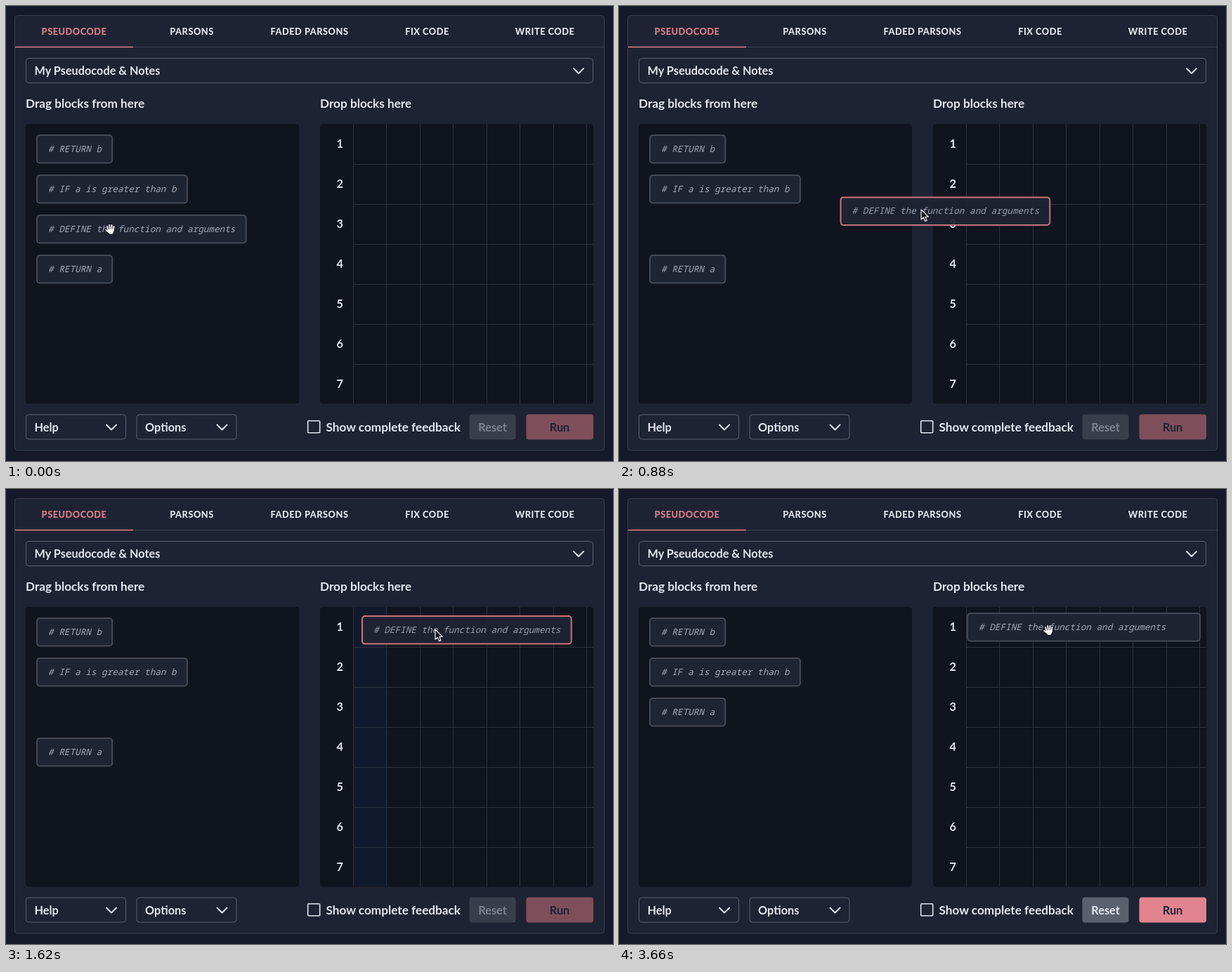
An HTML page that plays this animation: 864 by 648 pixels, repeating every 3.8 s.

```html
<!DOCTYPE html>
<html lang="en">
<head>
<meta charset="utf-8">
<title>Pseudocode blocks</title>
<style>
  html, body { margin: 0; width: 100%; height: 100%; overflow: hidden; background: #15192a; }
  svg { display: block; }
  text { font: 700 16.3px Lato, "Open Sans", sans-serif; fill: #e4e7f0; white-space: pre; }
  .tab { font-size: 12.8px; font-weight: 800; letter-spacing: .5px; text-anchor: middle; }
  .label { font-size: 17.2px; }
  .row { text-anchor: end; }
  .button { text-anchor: middle; }
  .box { fill: #1e2333; stroke: #5b6070; }
  .well { fill: #10141e; }
  .grid { stroke: #2d313d; fill: none; }
  .chevron { fill: none; stroke: #e4e7f0; stroke-width: 2; stroke-linecap: round; stroke-linejoin: round; }
  .block rect { fill: #1f2433; stroke: #454955; stroke-width: 2; }
  .block text { font: italic 500 12.7px "Noto Sans Mono", "DejaVu Sans Mono", monospace; fill: #a4a7b0; }
  #drag rect { stroke: #d47c86; }
</style>
</head>
<body>
<svg id="stage" width="864" height="648" viewBox="0 0 864 648">
  <rect class="box" x="12.5" y="13.5" width="839" height="619.5" rx="4" style="stroke:#3a3f50"/>
  <path d="M13 58.5H851" stroke="#3a3f50"/>
  <path d="M13 58.5H181" stroke="#e08089" stroke-width="1.5"/>
  <g id="ui"></g>
  <rect class="well" x="28" y="168" width="389" height="398.5" rx="4"/>
  <rect class="well" x="447" y="168" width="389" height="398.5" rx="4"/>
  <rect id="glow" x="495" y="168" width="47.5" height="398" fill="#111a2d"/>
  <g id="cells"></g>
  <rect x="429.7" y="590.7" width="17" height="17" rx="1" fill="none" stroke="#e4e7f0" stroke-width="1.6"/>
  <rect id="resetBox" x="659.5" y="581.5" width="66" height="36" rx="4"/>
  <text id="resetText" class="button" x="692.5" y="606">Reset</text>
  <rect id="runBox" x="740.5" y="581.5" width="95.5" height="36" rx="4"/>
  <text class="button" x="788" y="606" style="fill:#1e2333">Run</text>
  <g id="blocks"></g>
  <g id="arrow">
    <path d="M0 0V14.2L3.3 11.2 5.6 16.6 8 15.6 5.8 10.4H10.2Z" fill="#10131c" stroke="#f4f4f6" stroke-width="1.2" stroke-linejoin="round"/>
  </g>
  <g id="hand" stroke-linecap="round" stroke-linejoin="round">
    <path id="palm" d="M-3 1L4.6 .5 4.4 3 3 6.2H-1.2L-3.2 3.2Z" fill="#fff" stroke="#151821" stroke-width="3"/>
    <g id="fingers"></g>
    <path d="M-3 1L4.6 .5 4.4 3 3 6.2H-1.2L-3.2 3.2Z" fill="#fff" stroke="#fff"/>
  </g>
</svg>
<script>
const LOOP = 3800, GRAB = 480, DROP = 1720, GONE = 1860, PLACE = 2060;
const CHAR = 7.62, GRIP = [105, 20], LAG = 15;
const $ = id => document.getElementById(id);

function add(parent, tag, attrs, label) {
  const el = document.createElementNS('http://www.w3.org/2000/svg', tag);
  for (const k in attrs) el.setAttribute(k, attrs[k]);
  if (label) el.textContent = label;
  return parent.appendChild(el);
}
const text = (cls, x, y, label) => add($('ui'), 'text', { class: cls, x, y }, label);

function select(x, y, width, label) {
  add($('ui'), 'rect', { class: 'box', x: x + .5, y: y + .5, width, height: 35, rx: 4 });
  add($('ui'), 'path', { class: 'chevron', d: `M${x + width - 27} ${y + 15}l7 7 7-7` });
  text('', x + 12.5, y + 24, label);
}

function block(label, x, y, width = label.length * CHAR + 32, id = '') {
  const g = add($('blocks'), 'g', { class: 'block', id });
  add(g, 'rect', { x: 1, y: 1, width: width - 1, height: 39.5, rx: 4 });
  add(g, 'text', { x: 17, y: 25 }, label);
  move(g, x, y);
  return g;
}

function move(el, x, y) { el.setAttribute('transform', `translate(${x} ${y})`); }

// Static interface
['PSEUDOCODE', 'PARSONS', 'FADED PARSONS', 'FIX CODE', 'WRITE CODE'].forEach((name, i) => {
  const tab = text('tab', 97 + i * 167.5, 41, name);
  if (!i) tab.style.fill = '#e08089';
});
select(28, 74, 807, 'My Pseudocode & Notes');
select(28, 581.5, 142, 'Help');
select(185.5, 581.5, 142, 'Options');
text('label', 28, 145, 'Drag blocks from here');
text('label', 447, 145, 'Drop blocks here');
text('label', 455.5, 605.5, 'Show complete feedback');

let lines = '';
for (let i = 0; i < 8; i++) lines += `M${Math.floor(495 + i * 47.5) - .5} 168V566`;
for (let i = 0; i < 6; i++) lines += `M495 ${225.5 + i * 57}H836`;
add($('cells'), 'path', { class: 'grid', d: lines });
for (let i = 0; i < 7; i++) add($('cells'), 'text', { class: 'row', x: 480, y: 202 + i * 57 }, i + 1);

// Code blocks
const DEFINE = '# DEFINE the function and arguments';
block('# RETURN b', 43, 183);
block('# IF a is greater than b', 43, 240);
const home = block(DEFINE, 43, 297);
const last = block('# RETURN a', 43, 354);
const placed = block(DEFINE, 495, 176, 332);
const drag = block(DEFINE, 0, 0, undefined, 'drag');

// Open hand: dark outline first, white on top
for (const [stroke, width] of [['#151821', 3.4], ['#fff', 1.9]])
  add($('fingers'), 'path', {
    d: 'M-2.5 2L-4.5-4M-.4 1L-1.3-6M2 1V-6M4.3 1.5L5-4M-3 3.6L-6.3 .8',
    stroke, 'stroke-width': width, fill: 'none'
  });

// Monotone cubic through the points of the drag: time, x, y
const route = [[GRAB, 43, 297], [680, 172, 288], [1080, 431, 247], [1340, 506, 186], [1660, 506, 180]];

function slope(i, k) {
  if (i < 1 || i > route.length - 2) return 0;
  const rate = j => (route[j + 1][k] - route[j][k]) / (route[j + 1][0] - route[j][0]);
  const a = rate(i - 1), b = rate(i);
  return a * b > 0 ? 2 * a * b / (a + b) : 0;
}

function dragAt(t) {
  t = Math.min(Math.max(t, GRAB), 1660);
  let i = 0;
  while (i < route.length - 2 && t > route[i + 1][0]) i++;
  const p = route[i], q = route[i + 1], d = q[0] - p[0], u = (t - p[0]) / d;
  return [1, 2].map(k =>
    p[k] + (q[k] - p[k]) * u * u * (3 - 2 * u) +
    d * u * (1 - u) * ((1 - u) * slope(i, k) - u * slope(i + 1, k)));
}

const ramp = (t, a, b) => Math.min(Math.max((t - a) / (b - a), 0), 1);
const ease = u => u * u * (3 - 2 * u);
const mix = (a, b, u) => `rgb(${a.map((v, i) => Math.round(v + (b[i] - v) * u))})`;
const show = (el, on) => { el.style.display = on ? '' : 'none'; };

function draw(t) {
  const dragging = t >= GRAB && t < GONE;
  show(home, t < GRAB);
  show(drag, dragging);
  move(drag, ...dragAt(t));
  drag.style.opacity = .93 * (1 - ramp(t, DROP, GONE));
  $('glow').style.opacity = ramp(t, 1120, 1300) * (1 - ramp(t, DROP, GONE));

  const settle = ease(ramp(t, PLACE, 2360));
  move(last, 43, 354 - 57 * settle);
  placed.style.opacity = ramp(t, PLACE, 2200);

  const on = ramp(t, PLACE, 2380);
  $('resetBox').style.fill = mix([57, 62, 76], [91, 96, 111], on);
  $('resetText').style.fill = mix([126, 130, 142], [228, 231, 240], on);
  $('runBox').style.fill = mix([126, 79, 91], [226, 132, 143], on);

  const [x, y] = dragAt(t < GRAB ? t : t + LAG);
  const open = t < GRAB || t >= PLACE + 40;
  show($('hand'), open);
  show($('arrow'), !open);
  move($('hand'), x + GRIP[0] + .5, y + GRIP[1] + 1);
  move($('arrow'), x + GRIP[0], y + GRIP[1]);
}

const start = performance.now();
function tick(now) {
  draw(Math.max(0, now - start) % LOOP);
  requestAnimationFrame(tick);
}
draw(0);
requestAnimationFrame(tick);
</script>
</body>
</html>
```
